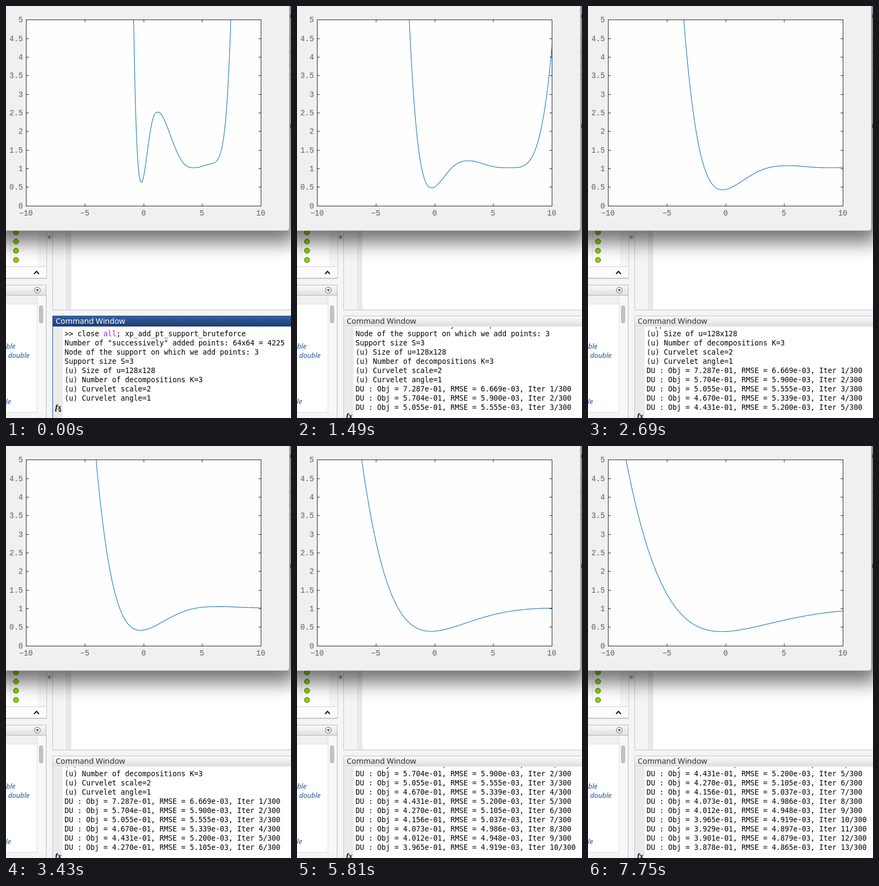
Animation, 528 px wide and 761 px high, one loop 8000 ms. Source, as an HTML page:

```html
<!DOCTYPE html>
<html lang="en">
<head>
<meta charset="utf-8">
<title>Plot and command window</title>
<style>
html, body { margin: 0; width: 100%; height: 100%; overflow: hidden; background: #fff; }
svg { display: block; }
.mono { font: 13.29px "DejaVu Sans Mono", monospace; fill: #000; white-space: pre; }
.tick { font: 14px "Liberation Mono", monospace; fill: #5c5c5c; }
.type { font: italic 13px "Noto Sans", sans-serif; fill: #1d5596; }
.title { font: 14.4px "Noto Sans", sans-serif; }
.fx { font: italic bold 14px "Liberation Serif", serif; }
</style>
</head>
<body>
<svg id="stage" width="528" height="761" viewBox="0 0 528 761">
  <defs>
    <linearGradient id="active" x2="0" y2="1">
      <stop offset="0" stop-color="#34609f"/><stop offset="1" stop-color="#1b3d78"/>
    </linearGradient>
    <linearGradient id="idle" x2="0" y2="1">
      <stop offset="0" stop-color="#fafafa"/><stop offset="1" stop-color="#dedede"/>
    </linearGradient>
    <filter id="blur" x="-20%" y="-20%" width="140%" height="140%"><feGaussianBlur stdDeviation="17"/></filter>
    <clipPath id="plotClip"><rect x="37" y="25" width="436" height="345"/></clipPath>
    <clipPath id="textClip"><rect x="87" y="593" width="441" height="168"/></clipPath>
  </defs>

  <rect width="528" height="761" fill="#f5f5f5"/>

  <!-- file list -->
  <rect width="59" height="481" fill="#fff"/>
  <path d="M8.5 400V470" stroke="#e4e4e4"/>
  <rect x="59" width="15" height="481" fill="#f5f5f5"/>
  <g id="dots" fill="#8fd400" stroke="#3c6e00"></g>
  <rect y="481" width="74" height="22" fill="#fcfcfc"/>
  <path d="M0 481.5H74" stroke="#d0d0d0"/>
  <path d="M0 503H75" stroke="#b4b4b4" stroke-width="1.5"/>
  <path d="M52 495l4.5-5 4.5 5" fill="none" stroke="#111" stroke-width="2"/>

  <!-- workspace -->
  <rect y="515" width="75" height="20" fill="url(#idle)"/>
  <path d="M0 515.5H74.5V761" fill="none" stroke="#b0b8c0"/>
  <circle cx="58" cy="525" r="5.5" fill="#f6f6f6" stroke="#666"/>
  <path d="M55 523.5h6l-3 4z" fill="#444"/>
  <rect y="535" width="74" height="216" fill="#fff"/>
  <rect y="535" width="57" height="16" fill="#f0f0f0"/>
  <path d="M0 550.5H57M57.5 535V751M0 750.5H57" stroke="#dcdcdc"/>
  <path d="M0 534.5H74" stroke="#b8b8b8"/>
  <rect x="58" y="535" width="16" height="216" fill="#f8f8f8"/>
  <rect x="61" y="553" width="8" height="33" rx="4" fill="#c1c1c1"/>
  <text class="type" x="17.5" y="633" text-anchor="end">ble</text>
  <text class="type" x="4" y="650">double</text>
  <text class="type" x="9.5" y="735" text-anchor="end">le</text>

  <!-- editor -->
  <path d="M75.5 400V503" stroke="#c4ccd4"/>
  <rect x="87" y="400" width="441" height="161" fill="#fff"/>
  <rect x="87" y="400" width="22" height="161" fill="#f4f4f4"/>
  <rect x="110" y="400" width="11" height="161" fill="#e9e9e9"/>
  <path d="M86.5 400V561.5H528" fill="none" stroke="#b9c5d2"/>
  <rect x="77" y="423" width="7" height="8" rx="2" fill="#d2d2d2"/>
  <circle cx="80.5" cy="427" r="2" fill="#8d8d8d"/>

  <!-- command window -->
  <rect x="87" y="591" width="441" height="170" fill="#fff"/>
  <rect x="87" y="591" width="18" height="170" fill="#ebebeb"/>
  <g clip-path="url(#textClip)"><g id="log"></g></g>
  <rect id="bar" x="86" y="573" width="442" height="19"/>
  <path id="edge" d="M528 572.5H86.5V761" fill="none"/>
  <text id="caption" class="title" x="92" y="587">Command Window</text>
  <g id="fx"><text class="fx" x="91" y="746">fx</text><path d="M97 747h6l-3 3z"/></g>

  <!-- figure window -->
  <path d="M525 62.5h3M525 85.5h3M525 107.5h3M525 127.5h3" stroke="#888"/>
  <rect x="-200" y="-100" width="736" height="537" filter="url(#blur)" opacity=".55"/>
  <path d="M527.5 16v6M527.5 218v8" stroke="#111"/>
  <path d="M-10-10H525V409q0 6-6 6H-10z" fill="#f0f0f0" stroke="#9a9a9a" stroke-width=".6"/>
  <rect x="37.5" y="25.5" width="435" height="344" fill="#fefefe"/>
  <g clip-path="url(#plotClip)"><path id="curve" fill="none" stroke="#1674c2" stroke-width="1.1"/></g>
  <rect x="37.5" y="25.5" width="435" height="344" fill="none" stroke="#262626"/>
  <path id="ticks" stroke="#262626"/>
  <g id="labels" class="tick"></g>
</svg>
<script>
const LOOP = 8000;
const $ = id => document.getElementById(id);

// One solver step takes about 595 ms, with a longer pause before steps 5 and 10.
const stepTime = k => 890 + 596 * (k - 1) + (k > 5 ? 150 : 0) + (k > 9 ? 155 : 0);
const stepAt = t => {
  let k = 0;
  while (k < 12 && t >= stepTime(k + 1) - 6) k++;
  return k;
};
const plotLead = 150; // at step 5 the plot updates before the log

const objective = [7.287, 5.704, 5.055, 4.67, 4.431, 4.27, 4.1564, 4.073, 4.012, 3.965, 3.929, 3.9008, 3.878];
const samples = 128 * 128;
const iterLine = (v, i) => {
  const rmse = Math.sqrt(v / 10 / samples) * 1000;
  return `DU : Obj = ${v.toFixed(3)}e-01, RMSE = ${rmse.toFixed(3)}e-03, Iter ${i + 1}/300`;
};
const intro = [
  '>> close <tspan fill="#a020f0">all</tspan>; xp_add_pt_support_bruteforce',
  'Number of "successively" added points: 64x64 = 4225',
  'Node of the support on which we add points: 3',
  'Support size S=3',
  '(u) Size of u=128x128',
  '(u) Number of decompositions K=3',
  '(u) Curvelet scale=2',
  '(u) Curvelet angle=1'
];
const lines = intro.concat(objective.map(iterLine));

// where the curve leaves the top of the plot: [step, x]
const exits = [[0, 236.5], [2, 208], [4, 177.5], [7, 146], [9, 120], [12, 70.5]];
function exitX(k) {
  const i = Math.max(1, exits.findIndex(e => e[0] >= k));
  const [k0, x0] = exits[i - 1], [k1, x1] = exits[i];
  return x0 + (x1 - x0) * (k - k0) / (k1 - k0);
}

const toY = v => 369.2 - 68.7 * v;
const rise = (t, n) => 1 - (1 - t) ** n * (1 + n * t);
const smooth = t => t * t * (3 - 2 * t);

// Valley, hump, second valley and steep tail; everything widens and flattens with each step.
function curvePath(k) {
  const lowX = 251 - Math.sqrt(k), left = lowX - exitX(k);
  const humpX = lowX + left * (1.65 + .0085 * k * k + .48 * Math.exp(-2 * k));
  const dipX = humpX + 67 + 2 * k;
  const tail = 67.5 + 9 * k, power = 3.4 + 4.4 * Math.exp(-k);
  const bump = .1 * Math.exp(-2 * k);
  const low = objective[k] / 10 - .093 / (1 + k) ** 1.3;
  const over = 1.52 / (1 + .84 * k) ** 2;
  const hump = 1 + over, dip = 1 + Math.min(.025, over / 2);

  const value = x => {
    if (x < lowX) {
      const s = (lowX - x) / left;
      return low + (5 - low) * s * s * (.35 + .42 * s + .23 * s * s);
    }
    if (x < humpX) return low + (hump - low) * rise((x - lowX) / (humpX - lowX), 3 + .02 * k * k);
    if (x < dipX) return hump + (dip - hump) * rise((x - humpX) / (dipX - humpX), 3);
    const s = (x - dipX) / tail;
    return dip + bump * smooth(Math.min(1, 2 * s)) + (5 - dip - bump) * s ** power;
  };
  const points = [];
  for (let x = 37; x <= 473; x += .5) {
    const y = toY(value(x));
    if (y > -100) points.push(x + ' ' + y.toFixed(2));
  }
  return 'M' + points.join('L');
}
const paths = objective.map((_, k) => curvePath(k));

function drawAxes() {
  let d = '', text = '';
  for (let i = 0; i <= 10; i++) {
    const y = Math.round(368.55 - 34.31 * i) + .5;
    d += `M38 ${y}h4M472 ${y}h-4`;
    text += `<text x="31.5" y="${y + 4}" text-anchor="end">${i / 2}</text>`;
  }
  for (let i = 0; i <= 4; i++) {
    const x = Math.round(37 + 108.75 * i) + .5;
    d += `M${x} 26v4M${x} 369v-4`;
    const label = String(5 * i - 10).replace('-', '\u2212');
    text += `<text x="${x - .5}" y="387" text-anchor="middle">${label}</text>`;
  }
  $('ticks').setAttribute('d', d);
  $('labels').innerHTML = text;
}

$('dots').innerHTML = [0, 1, 2, 3].map(i => `<circle cx="18.5" cy="${418 + 17 * i}" r="4.8"/>`).join('');
$('log').innerHTML = lines.map((s, i) =>
  `<text class="mono" xml:space="preserve" x="108.5" y="${610 + 17 * i}">${s}</text>`).join('');
const rows = [...$('log').children];
drawAxes();

function render(t) {
  const step = stepAt(t);
  const late = t >= stepTime(5) && t < stepTime(5) + plotLead;
  const iter = t < 150 ? 0 : step + (late ? 0 : 1);
  const idle = iter > 0;
  $('curve').setAttribute('d', paths[step]);
  $('log').setAttribute('transform', `translate(0 ${-17 * Math.max(0, iter - 1)})`);
  rows.forEach((r, i) => r.setAttribute('visibility', i < intro.length + iter ? 'visible' : 'hidden'));
  $('bar').setAttribute('fill', idle ? 'url(#idle)' : 'url(#active)');
  $('edge').setAttribute('stroke', idle ? '#b9c5d2' : '#2a5290');
  $('caption').setAttribute('fill', idle ? '#333' : '#fff');
  $('fx').setAttribute('transform', `translate(0 ${idle ? 16 : 0})`);
}

const start = performance.now();
function tick() {
  render((performance.now() - start) % LOOP);
  requestAnimationFrame(tick);
}
tick();
</script>
</body>
</html>
```
